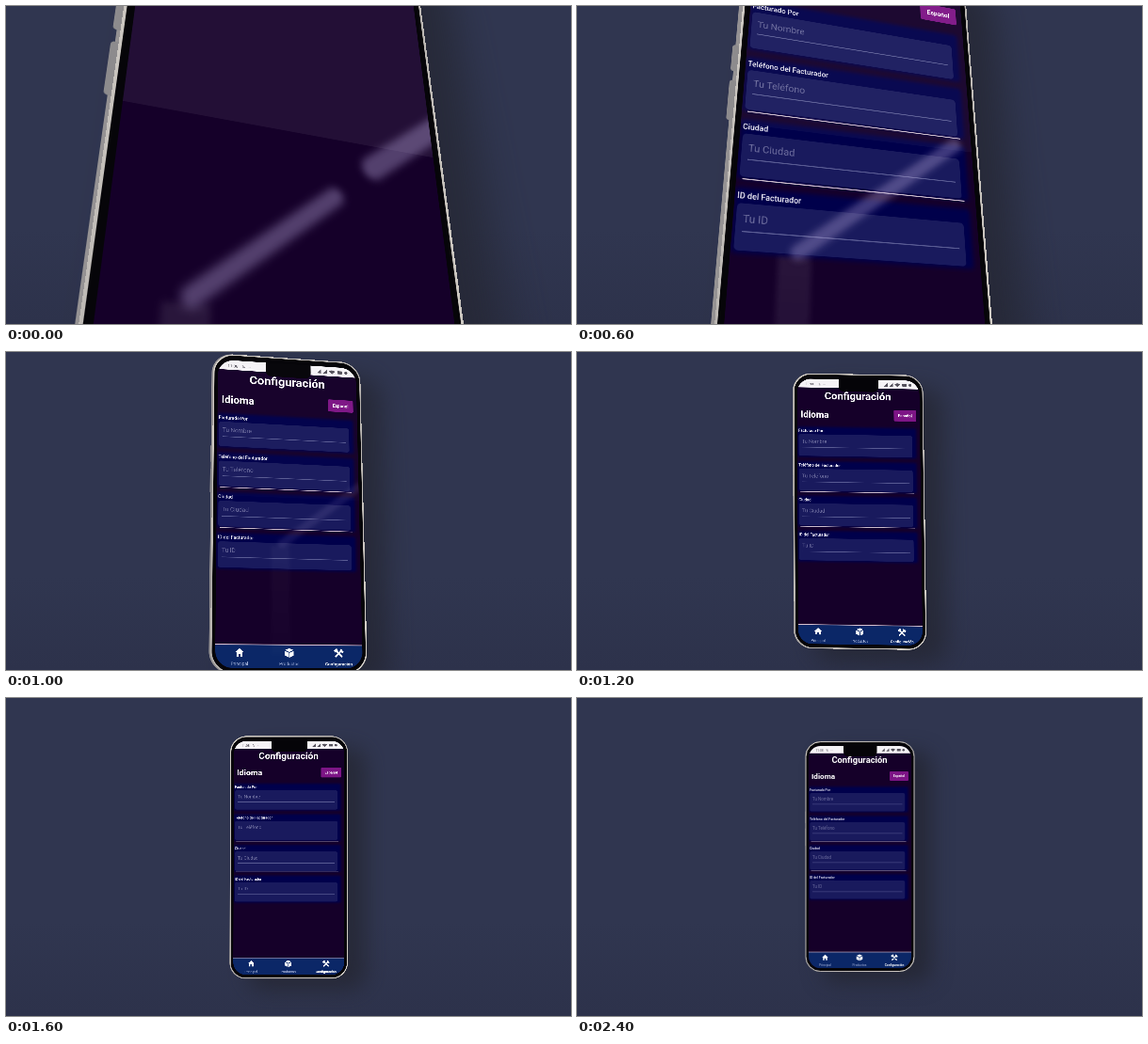
Write an HTML page that moves like this. It is 600 by 338 pixels and loops after 4 s.

```html
<!DOCTYPE html>
<html lang="es">
<head>
<meta charset="utf-8">
<style>
  html, body { margin: 0; width: 100%; height: 100%; overflow: hidden; }
  body { position: relative; background: linear-gradient(#303650 70%, #2d324b); }
  #back, #front { position: absolute; left: 0; top: 0; width: 464px; height: 980px; transform-origin: 0 0; }
  #back { border-radius: 64px; background: #959293; box-shadow: 72px 46px 84px 0 rgba(34, 36, 46, .7); }
  #back i { position: absolute; left: calc(var(--depth) * -1.3px); width: 12px; border-radius: 5px; background: #8d8b8d; }
  #front { overflow: visible; font-family: Roboto, sans-serif; }
  .label { font-size: 14px; font-weight: 500; fill: #f4f2fa; }
  .hint { font-size: 18px; fill: #6c6c9d; }
  .tab { font-size: 13px; fill: #a9b6dc; text-anchor: middle; }
  .bold { font-weight: 700; fill: #fff; }
</style>
</head>
<body>
<div id="back"><i style="top:296px;height:54px"></i><i style="top:368px;height:78px"></i></div>
<svg id="front" viewBox="0 0 464 980">
  <defs>
    <clipPath id="screen"><rect x="14" y="20" width="436" height="944" rx="50"/></clipPath>
    <linearGradient id="metal" x2="1" y2="1">
      <stop stop-color="#d8d3cb"/><stop offset=".5" stop-color="#b4b0ad"/><stop offset="1" stop-color="#d9d4cc"/>
    </linearGradient>
    <linearGradient id="beam" x2="0" y2="1">
      <stop stop-color="#fff" stop-opacity=".09"/><stop offset="1" stop-color="#fff" stop-opacity=".03"/>
    </linearGradient>
    <filter id="soft" x="-20%" y="-20%" width="140%" height="140%"><feGaussianBlur stdDeviation="4"/></filter>
    <filter id="softer" x="-20%" y="-20%" width="140%" height="140%"><feGaussianBlur stdDeviation="6"/></filter>
  </defs>
  <rect x="2" y="2" width="460" height="976" rx="63" fill="#060509" stroke="url(#metal)" stroke-width="4"/>
  <g clip-path="url(#screen)">
    <rect width="464" height="980" fill="#150029"/>
    <g id="ui">
      <text class="bold" x="230" y="93" font-size="37.5" text-anchor="middle">Configuración</text>
      <text class="bold" x="26" y="160" font-size="32.5">Idioma</text>
      <rect x="358" y="128" width="80" height="40" rx="4" fill="#7d1586"/>
      <text class="bold" x="398" y="153" font-size="14" text-anchor="middle">Español</text>
      <g id="fields"></g>
      <rect y="896" width="464" height="84" fill="#0b2767"/>
      <path d="M0 896H464" stroke="#d9c3cf" stroke-width="2.5"/>
      <g fill="#fff">
        <path d="M84 907L97 919H93V931H87V923H81V931H75V919H71Z"/>
        <path d="M230 906L242 911 230 917 218 911ZM217 914L229 919V933L217 927ZM243 914L231 919V933L243 927Z"/>
        <path d="M369 911L387 929M387 911L369 929" stroke="#fff" stroke-width="5" stroke-linecap="round"/>
        <path d="M363 912L372 905 376 912 368 918ZM383 905L387 911 393 914 390 919 381 915Z"/>
      </g>
      <text class="tab" x="84" y="956">Principal</text>
      <text class="tab" x="230" y="956">Productos</text>
      <text class="tab bold" x="378" y="956">Configuración</text>
      <rect width="464" height="51" fill="#f5f3f6"/>
      <g fill="#55525c" font-size="13">
        <text x="44" y="43">11:08</text><text x="88" y="43">%</text><text x="106" y="43">···</text>
        <path d="M324 43H337V30ZM343 43H356V30ZM362 35Q372 27 382 35L372 44Z"/>
        <rect x="389" y="32" width="16" height="10" rx="2"/><circle cx="417" cy="37" r="5"/>
      </g>
    </g>
    <path d="M162 14H304V44Q304 64 284 64H182Q162 64 162 44Z" fill="#050408"/>
    <rect id="sheen" width="464" height="451" fill="#fff"/>
    <g id="glare">
      <g fill="url(#beam)" filter="url(#soft)">
        <rect x="80" y="684" width="54" height="320"/>
        <rect id="spot" x="334" y="714" width="56" height="90"/>
      </g>
      <g stroke="#b8a8dc" stroke-opacity=".38" stroke-linecap="round" filter="url(#softer)">
        <path id="streak" stroke-width="25"/>
        <path id="corner" d="M350 484L490 380" stroke-width="34"/>
      </g>
    </g>
  </g>
</svg>
<script>
const $ = id => document.getElementById(id);
const ROW = 391, STEP = 124, WIDTH = 464, SPAN = 2 * STEP;

$("fields").innerHTML = [
  ["Facturado Por", "Tu Nombre"], ["Teléfono del Facturador", "Tu Teléfono"],
  ["Ciudad", "Tu Ciudad"], ["ID del Facturador", "Tu ID"]
].map(([label, hint], i) => {
  const y = ROW + (i - 1) * STEP;
  return `<rect x="14" y="${y - 74}" width="423" height="109" rx="6" fill="#04044b" filter="url(#soft)"/>
    <text class="label" x="18" y="${y - 55}">${label}</text>
    <rect x="19" y="${y - 47}" width="404" height="78" rx="7" fill="#191a5d"/>
    <text class="hint" x="30" y="${y - 15}">${hint}</text>
    <path d="M30 ${y}H412" stroke="#6f70a6" stroke-width="1.5"/>` +
    (i == 1 || i == 2 ? `<path d="M24 ${y + 35}H428" stroke="#cdbecd" stroke-width="1.8"/>` : "");
}).join("");

// time, phone edges at the second and fourth underline (x, y: left, right, left, right), side thickness
const poses = [
  [300, 117.5, 54, 457, 124, 88, 262, 481, 301, 4],
  [400, 126.5, 55.2, 453, 122, 99, 254, 473, 291, 4],
  [600, 168, 91, 423.6, 126, 155, 238, 434.6, 260, 4],
  [800, 201, 119.8, 395.5, 135.3, 197, 226.4, 399.5, 235, 3],
  [1200, 230, 137.7, 369, 140, 230.3, 211.8, 370, 214, .6],
  [1600, 238, 143, 363, 143, 237.8, 208.3, 363, 208.3, .2],
  [2400, 242.5, 143.8, 358.5, 143.8, 242.5, 205.8, 358.5, 205.8, 0]
];
const slope = (i, k) => (poses[i + 1][k] - poses[i][k]) / (poses[i + 1][0] - poses[i][0]);
function tangent(i, k) {
  if (i == 0 || i == poses.length - 1) return 0;
  const a = slope(i - 1, k), b = slope(i, k);
  return a * b > 0 ? 2 * a * b / (a + b) : 0;
}
function poseAt(time) {
  const t = Math.min(2400, Math.max(300, time));
  let i = 0;
  while (i < poses.length - 2 && t > poses[i + 1][0]) i++;
  const [p, q] = [poses[i], poses[i + 1]], d = q[0] - p[0], s = (t - p[0]) / d, r = 1 - s;
  return p.slice(1).map((_, n) => {
    const k = n + 1;
    return r * r * (1 + 2 * s) * p[k] + s * s * (3 - 2 * s) * q[k]
      + d * s * r * (r * tangent(i, k) - s * tangent(i + 1, k));
  });
}
// Perspective matrix that carries the strip between the two underlines onto four points
function project([x0, y0, x1, y1, x2, y2, x3, y3], shift = 0) {
  const ax = x1 - x3, ay = y1 - y3, bx = x2 - x3, by = y2 - y3;
  const sx = x0 - x1 - x2 + x3, sy = y0 - y1 - y2 + y3, det = ax * by - bx * ay;
  const g = (sx * by - bx * sy) / det, h = (ax * sy - sx * ay) / det;
  const line = (a, b, c) => [a / WIDTH, b / SPAN, c - b * ROW / SPAN];
  const w = line(g, h, 1);
  const x = line(x1 - x0 + g * x1, x2 - x0 + h * x2, x0).map((v, i) => v - shift * w[i]);
  const y = line(y1 - y0 + g * y1, y2 - y0 + h * y2, y0);
  const m = [x[0], y[0], 0, w[0], x[1], y[1], 0, w[1], 0, 0, 1, 0, x[2], y[2], 0, w[2]];
  return `matrix3d(${m.map(v => v.toFixed(9))})`;
}
const ramp = (t, a, b) => Math.min(1, Math.max(0, (t - a) / (b - a)));

function draw(now) {
  const t = Math.floor(now % 4000 / 100) * 100, pose = poseAt(t), depth = pose[8];
  const fade = 1 - ramp(t, 600, 1200), merge = ramp(t, 300, 600), slide = ramp(t, 500, 800) ** 2;
  $("front").style.transform = project(pose);
  $("back").style.transform = project(pose, depth);
  $("back").style.setProperty("--depth", depth);
  $("ui").setAttribute("opacity", t < 100 ? 0 : 1);
  $("sheen").setAttribute("opacity", t < 100 ? .06 : .035 * fade);
  $("glare").setAttribute("opacity", t < 100 ? 1 : .9 * fade);
  $("glare").setAttribute("transform", `translate(${98 * slide} ${-82 * slide})`);
  $("streak").setAttribute("d", `M112 676L${290 + 115 * merge} ${535 - 85 * merge}`);
  $("corner").setAttribute("opacity", 1 - merge);
  $("spot").setAttribute("opacity", 1 - merge);
  requestAnimationFrame(draw);
}
requestAnimationFrame(draw);
</script>
</body>
</html>
```
